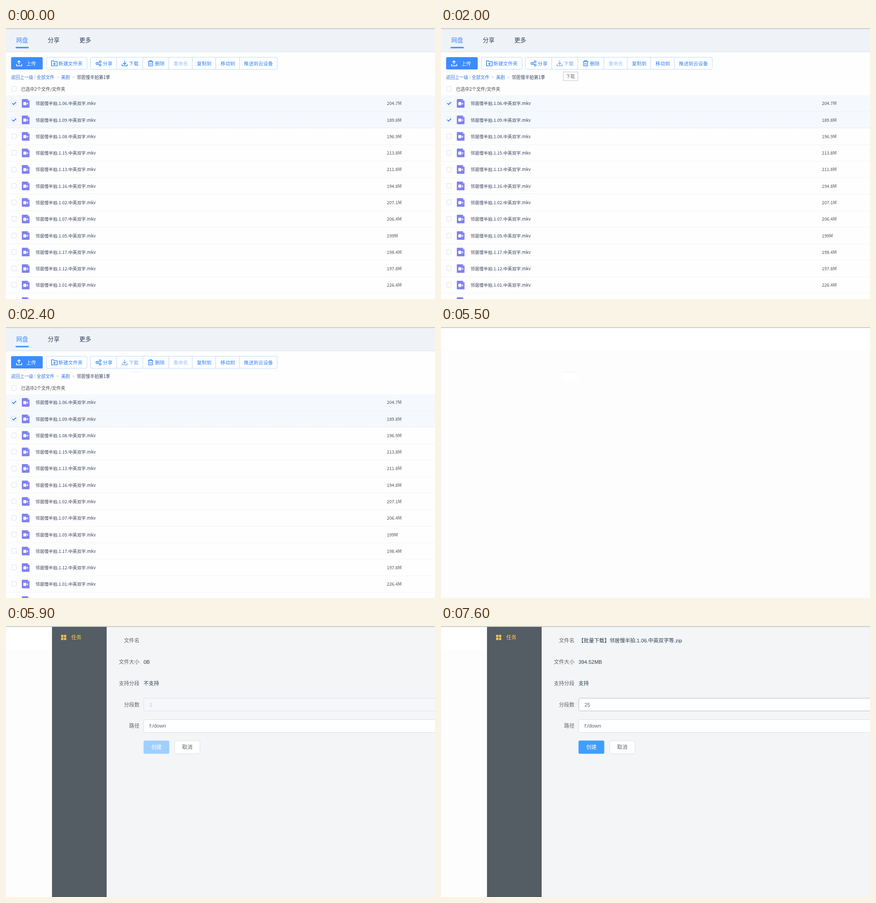
These frames come from a looping animation (942 by 595 pixels, 8 s). An HTML page:

```html
<!DOCTYPE html>
<html>
<head>
<meta charset="utf-8">
<title>Batch download</title>
<style>
  html, body { margin: 0; width: 100%; height: 100%; overflow: hidden; background: #fdfdfd; }
  svg { display: block; }
  text { font: 9.75px "Noto Sans CJK SC", "Noto Sans CJK JP", "Noto Sans CJK", sans-serif; fill: #36405a; white-space: pre; }
  .tab { font-size: 13px; }
  .tool text { font-size: 10.65px; fill: #2f80fb; }
  .tool .on { fill: #fff; }
  .tool .off { fill: #94c0ff; }
  .frame { fill: #fff; stroke: #bcd8ff; }
  .ink { fill: none; stroke: #3b8cff; stroke-width: 1.6; }
  .link { fill: #3577e0; }
  .sep { fill: #b9cbe6; }
  .name { font-size: 9.6px; }
  .size { fill: #505050; }
  .form text { font: 11.34px "Liberation Sans", "Noto Sans CJK SC", "Noto Sans CJK JP", "Noto Sans CJK", sans-serif; fill: #2c3e50; }
  .form .label { text-anchor: end; fill: #606266; }
  .form .mid { text-anchor: middle; }
  .form .soft { fill: #606266; }
  .form .pale { fill: #c0c4cc; }
  .form .white { fill: #fff; }
  .form .gold { fill: #ffd04b; }
  .field { fill: #fff; stroke: #dcdfe6; }

  .list, .remove, .download, .tip, .trace, .form, .before, .after, .create, .parts {
    animation: 8s step-end infinite;
  }
  .list { animation-name: list; }
  .remove { animation-name: remove; }
  .download { animation-name: download; }
  .tip { animation-name: tip; }
  .trace { animation-name: trace; }
  .form { animation-name: form; }
  .before { animation-name: before; }
  .after { animation-name: after; }
  .create { animation-name: create; }
  .parts { animation-name: parts; }
  @keyframes list { 0% { opacity: 1 } 68.75%, 100% { opacity: 0 } }
  @keyframes remove { 0% { opacity: 1 } 16.25% { opacity: .68 } 18.75%, 100% { opacity: 1 } }
  @keyframes download { 0% { opacity: 1 } 18.75% { opacity: .68 } 42.5%, 100% { opacity: 1 } }
  @keyframes tip {
    0% { opacity: 0 } 23.75% { opacity: .4 } 25% { opacity: .8 } 26.25% { opacity: 1 }
    27.5% { opacity: .65 } 28.75% { opacity: .3 } 30%, 100% { opacity: 0 }
  }
  @keyframes trace { 0% { opacity: 0 } 30%, 100% { opacity: 1 } }
  @keyframes form { 0% { opacity: 0 } 73.75%, 100% { opacity: 1 } }
  @keyframes before { 0% { opacity: 1 } 76.25%, 100% { opacity: 0 } }
  @keyframes after { 0% { opacity: 0 } 76.25%, 100% { opacity: 1 } }
  @keyframes create { 0% { fill: #a0cfff } 76.25% { fill: #70b6ff } 77.5%, 100% { fill: #409eff } }
  @keyframes parts {
    0% { fill: #f5f7fa; stroke: #e0e4ec }
    76.25% { fill: #fff; stroke: #dcdfe6 }
    95%, 100% { fill: #fff; stroke: #b8bdc9 }
  }
</style>
</head>
<body>
<svg width="942" height="595" viewBox="0 0 942 595">
  <defs>
    <g id="video">
      <path d="M36-9.5H47.7L51.6-5.6V8.2Q51.6 9.4 50.4 9.4H36Q34.8 9.4 34.8 8.2V-8.3Q34.8-9.5 36-9.5Z" fill="#7f80f0"/>
      <path d="M47.7-9.5L51.6-5.6H47.7Z" fill="#c3c3fa"/>
      <rect x="38" y="-3" width="6.8" height="7" rx="1.5" fill="#fff"/>
      <path d="M45.5.5L48.3-2.3V3.3Z" fill="#fff"/>
    </g>
    <rect id="box" x="12.5" y="-5.5" width="10" height="10.5" rx="1.5" fill="#fff" stroke="#d9dfea"/>
  </defs>

  <rect width="942" height="595" fill="#fdfdfd"/>
  <rect width="942" height="52" fill="#fff"/>

  <g class="list">
    <rect y="52" width="942" height="543" fill="#fefefe"/>
    <rect width="942" height="52" fill="#eff3f8"/>
    <rect y="52" width="942" height="1" fill="#d9e3ee"/>
    <text class="tab" x="22.5" y="31.3" style="fill:#3b8cff">网盘</text>
    <text class="tab" x="91.7" y="31.3">分享</text>
    <text class="tab" x="161" y="31.3">更多</text>
    <rect x="21" y="41.5" width="29" height="3" rx="1.2" fill="#3b8cff"/>

    <g class="tool">
      <rect x="11.2" y="64" width="69.4" height="27" rx="2.5" fill="#3b8cff"/>
      <path class="ink" style="stroke:#fff" d="M28.5 80V72.5M25 75.5L28.5 72L32 75.5M23 79V83H34.5V79"/>
      <text class="on" x="44.7" y="81.5">上传</text>

      <rect class="frame" x="88.8" y="64.3" width="89.2" height="26.4" rx="2.5"/>
      <path class="ink" d="M100 72H104.5L106 74H112.5V83H100ZM106.2 76V81.5M103.5 78.7H109"/>
      <text x="115" y="81.5">新建文件夹</text>

      <rect class="frame" x="185.6" y="64.3" width="409.8" height="26.4" rx="2.5"/>
      <path d="M243 64V91M300.5 64V91M357.5 64V91M409 64V91M460.5 64V91M512.5 64V91" stroke="#bcd8ff"/>
      <g class="ink" style="stroke-width:1.4">
        <circle cx="199.8" cy="78" r="2.2"/><circle cx="206.8" cy="74" r="2"/><circle cx="206.8" cy="81.5" r="2"/>
        <path d="M201.7 76.9L205 75M201.7 79L205 80.6"/>
      </g>
      <text x="212.5" y="81.5">分享</text>
      <g class="download">
        <path class="ink" d="M260.5 71.5V79.5M257 76.5L260.5 80L264 76.5M255 79.5V83H266.2V79.5"/>
        <text x="269.8" y="81.5">下载</text>
      </g>
      <g class="remove">
        <path class="ink" style="stroke-width:1.4" d="M311.7 73.8H323.3M315 73.5V71.7H320V73.5M313.2 74V83.2H321.8V74M316 77V80.7M319 77V80.7"/>
        <text x="327" y="81.5">删除</text>
      </g>
      <text class="off" x="367.8" y="81.5">重命名</text>
      <text x="419.2" y="81.5">复制到</text>
      <text x="471" y="81.5">移动到</text>
      <text x="522.3" y="81.5">推送到云设备</text>
    </g>

    <text class="link" x="11" y="112.2">返回上一级</text>
    <rect x="63" y="104" width="1" height="9" fill="#b9cbe6"/>
    <text class="link" x="67.3" y="112.2">全部文件</text>
    <text class="sep" x="111" y="112">&gt;</text>
    <text class="link" x="121" y="112.2">美剧</text>
    <text class="sep" x="145.7" y="112">&gt;</text>
    <text x="155.2" y="112.2">邻居慢半拍第1季</text>

    <use href="#box" y="134"/>
    <text x="33" y="137.8" style="fill:#484848">已选中2个文件/文件夹</text>
    <g id="rows"></g>
  </g>

  <g class="trace">
    <rect x="268" y="99" width="33" height="17" fill="#fff"/>
    <rect x="271" y="98.5" width="26" height="1" fill="#ededed"/>
  </g>
  <g class="tip">
    <rect x="268.5" y="96.5" width="32" height="19" fill="#fff" stroke="#bbb"/>
    <text x="274.5" y="109.8" style="fill:#575757">下载</text>
  </g>

  <g class="form">
    <rect x="101" width="120" height="595" fill="#545c64"/>
    <rect x="221" width="721" height="595" fill="#f3f5f7"/>
    <path d="M121 19.5h5v5h-5zM127.3 19.5h5v5h-5zM121 25.8h5v5h-5zM127.3 25.8h5v5h-5z" fill="#fcc64d"/>
    <text class="gold" x="143.2" y="29.2">任务</text>
    <text class="label" x="293" y="36.3">文件名</text>
    <text class="label" x="293" y="83.1">文件大小</text>
    <text class="label" x="293" y="130">支持分段</text>
    <text class="label" x="293" y="176.7">分段数</text>
    <text class="label" x="293" y="223.3">路径</text>
    <rect class="parts" x="302.5" y="158.5" width="660" height="28" rx="3"/>
    <rect class="field" x="302.5" y="205.5" width="660" height="28" rx="3"/>
    <text class="soft" x="315" y="223.2">f:/down</text>
    <rect class="create" x="302" y="251.5" width="56.5" height="29" rx="3"/>
    <text class="mid white" x="330.3" y="270.2">创建</text>
    <rect class="field" x="370.5" y="252" width="55.5" height="28" rx="3"/>
    <text class="mid soft" x="398.2" y="270.2">取消</text>
    <g class="before">
      <text x="302" y="83.1">0B</text>
      <text x="302" y="130">不支持</text>
      <text class="pale" x="315" y="176.7">1</text>
    </g>
    <g class="after">
      <text x="302" y="36.3">【批量下载】邻居慢半拍.1.06.中英双字等.zip</text>
      <text x="302" y="83.1">394.52MB</text>
      <text x="302" y="130">支持</text>
      <text class="soft" x="315" y="176.7">25</text>
    </g>
  </g>

  <rect width="942" height="1" fill="#eaeaea"/>
  <rect y="1" width="942" height="1" fill="#b4b4b4"/>
</svg>
<script>
  const files = `06 204.7M,09 189.8M,08 196.9M,15 213.8M,13 211.8M,16 194.8M,02 207.1M,
    07 206.4M,05 199M,17 198.4M,12 197.8M,01 226.4M,14 201.3M`.split(',').map(s => s.trim().split(' '));
  const pitch = 36.27;

  function row([episode, size], i) {
    const y = 165.5 + pitch * i;
    const edge = Math.round(183 + pitch * i) + .5;
    const picked = i < 2;
    const back = picked
      ? `<rect y="${edge - 36}" width="942" height="36" fill="#f5f9fe"/>
         <path d="M0 ${edge}H942" stroke="#d3dce8" stroke-dasharray="1 1"/>`
      : `<path d="M0 ${edge}H942" stroke="#f2f4f8"/>`;
    const tick = picked
      ? `<path d="M13.8 ${y - .4}l3 3l5-5.4" fill="none" stroke="#2f84fb" stroke-width="2"/>` : '';
    return `${back}<use href="#box" y="${Math.round(y)}"/>${tick}<use href="#video" y="${y}"/>
      <text class="name" x="64.8" y="${y + 3.9}">邻居慢半拍.1.${episode}.中英双字.mkv</text>
      <text class="size" x="836.3" y="${y + 3.9}">${size}</text>`;
  }

  document.getElementById('rows').innerHTML = files.map(row).join('');
</script>
</body>
</html>
```
